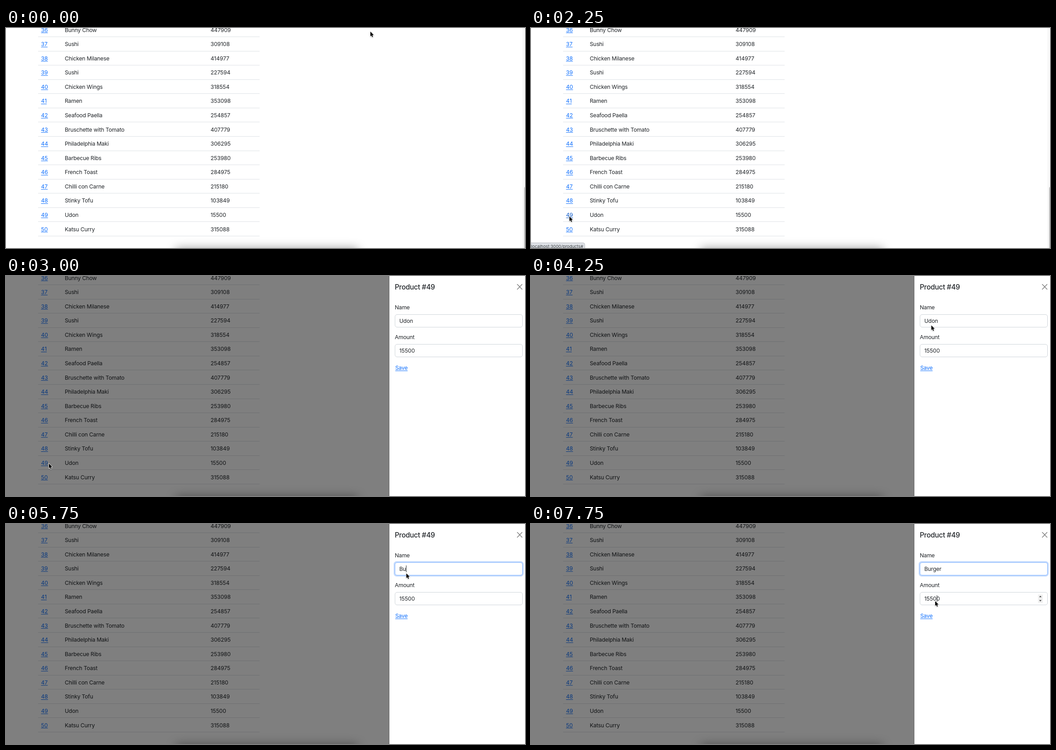
Animation of 1148x488 px, one loop 8000 ms. Source, as an HTML page with a canvas:

```html
<!DOCTYPE html>
<html lang="en">
<head>
<meta charset="utf-8">
<title>Products</title>
<style>
html, body { margin: 0; width: 100%; height: 100%; overflow: hidden; background: #fff; }
canvas { display: block; width: 1148px; height: 488px; }
</style>
</head>
<body>
<canvas id="stage"></canvas>
<script>
const W = 1148, H = 488, LOOP = 8000, STEP = 250;
const FONT = 'Inter, "Liberation Sans", sans-serif';
const INK = '#212529', LINK = '#0d6efd', LINK_HOVER = '#0a58ca', LINE = '#dee2e6';
const ROW_H = 31.57, FIRST_ROW = 4.2;

const canvas = document.getElementById('stage');
const ctx = canvas.getContext('2d');
const ratio = window.devicePixelRatio || 1;
canvas.width = W * ratio;
canvas.height = H * ratio;

const rows = [
  ['Bunny Chow', 447909], ['Sushi', 309108], ['Chicken Milanese', 414977],
  ['Sushi', 227594], ['Chicken Wings', 318554], ['Ramen', 353098],
  ['Seafood Paella', 254857], ['Bruschette with Tomato', 407779],
  ['Philadelphia Maki', 306295], ['Barbecue Ribs', 253980],
  ['French Toast', 284975], ['Chilli con Carne', 215180],
  ['Stinky Tofu', 103849], ['Udon', 15500], ['Katsu Curry', 315088]
];

// Pointer stops: time, x, y
const path = [
  [0, 806, 8], [1250, 110, 406], [1750, 85, 418], [2750, 85, 418],
  [3000, 95, 416], [3750, 831, 154], [4250, 885.5, 109.5], [6750, 885.5, 109.5],
  [7500, 894, 171], [LOOP, 894, 171]
];

const ease = p => p * p * (3 - 2 * p);

function pointerAt(t) {
  const i = path.findIndex(k => k[0] > t);
  const [t0, x0, y0] = path[i - 1], [t1, x1, y1] = path[i];
  const p = ease((t - t0) / (t1 - t0));
  return [x0 + (x1 - x0) * p, y0 + (y1 - y0) * p];
}

// Draws text centred on the line y and returns its width
function text(str, x, y, { size = 12.2, weight = 400, color = INK, spacing = -0.2, underline = false } = {}) {
  ctx.font = `${weight} ${size}px ${FONT}`;
  ctx.letterSpacing = spacing + 'px';
  ctx.fillStyle = color;
  const base = y + size * 0.364;
  ctx.fillText(str, x, base);
  const width = ctx.measureText(str).width;
  if (underline) ctx.fillRect(x, base + 1.5, width, 1);
  return width;
}

function rect(x, y, w, h, color) {
  ctx.fillStyle = color;
  ctx.fillRect(x, y, w, h);
}

function box(x, y, w, h, r, fill, stroke) {
  ctx.beginPath();
  ctx.roundRect(x, y, w, h, r);
  if (fill) { ctx.fillStyle = fill; ctx.fill(); }
  if (stroke) { ctx.strokeStyle = stroke; ctx.lineWidth = 1; ctx.stroke(); }
}

function poly(points, color) {
  ctx.beginPath();
  points.forEach(([x, y]) => ctx.lineTo(x, y));
  ctx.closePath();
  ctx.fillStyle = color;
  ctx.fill();
}

function drawTable(hover) {
  rows.forEach(([name, amount], i) => {
    const y = FIRST_ROW + i * ROW_H, id = 36 + i;
    text(String(id), 77.5, y, { color: hover === id ? LINK_HOVER : LINK, underline: true, spacing: 0 });
    text(name, 130, y);
    text(String(amount), 452.5, y, { spacing: -0.1 });
    rect(71, Math.round(y + 14.8), 490, 1, LINE);
  });
}

function drawDockShadow() {
  ctx.save();
  ctx.shadowColor = 'rgba(0,0,0,.4)';
  ctx.shadowBlur = 22 * ratio;
  rect(376, 489, 402, 40, '#000');
  ctx.restore();
}

function drawScrollbar() {
  rect(1143, 0, 5, H, '#fafafa');
  rect(1143, 0, 1, H, '#eeeeee');
  box(1146, 352, 8, 150, 4, '#c1c1c1');
}

function drawStatus(alpha) {
  ctx.save();
  ctx.globalAlpha = alpha;
  box(-5, 476.5, 124, 20, 4, '#dee1e6', '#b9bcc1');
  text('localhost:3000/products#', 0.5, 484.5, { size: 9.4, color: '#3c4043', spacing: 0 });
  ctx.restore();
}

function drawField(y, focused) {
  if (focused) box(857.5, y - 2.5, 287.5, 34, 6.5, '#c3dafe');
  box(860.5, y + 0.5, 282, 28, 4.5, '#fff', focused ? '#86b7fe' : '#ced4da');
}

function drawSpinner() {
  rect(1121.5, 156.5, 10.5, 18.5, '#efefef');
  poly([[1124, 162.3], [1129.4, 162.3], [1126.7, 159.2]], '#444');
  poly([[1124, 168.7], [1129.4, 168.7], [1126.7, 171.8]], '#444');
}

function drawCaret(x, y) {
  rect(x, y - 7.5, 1, 15, '#212529');
}

function typedName(t) {
  if (t < 5750) return 'Udon';
  return 'Burger'.slice(0, [2, 3, 5, 6][Math.min(3, (t - 5750) / STEP)]);
}

function drawPanel(t) {
  const focused = t >= 4500;
  ctx.save();
  ctx.translate(t < 3000 ? 71 : 0, 0);
  rect(848, 0, 310, H, '#fff');
  rect(847, 0, 1, H, 'rgba(0,0,0,.2)');
  text('Product #49', 860, 24.2, { size: 15.4, weight: 500, spacing: -0.25 });

  ctx.strokeStyle = '#7f7f7f';
  ctx.lineWidth = 1.5;
  ctx.lineCap = 'round';
  ctx.beginPath();
  ctx.moveTo(1131, 18.5); ctx.lineTo(1141.5, 29.5);
  ctx.moveTo(1141.5, 18.5); ctx.lineTo(1131, 29.5);
  ctx.stroke();

  text('Name', 860, 69.7);
  drawField(85, focused);
  if (t >= 4750 && t < 5750) rect(870, 90.5, 31, 18, '#b3d7ff');
  const end = 870 + text(typedName(t), 870, 99.7);
  if (focused && t < 7750 && !(t >= 4750 && t < 5750)) drawCaret(end, 99.5);

  text('Amount', 860, 136);
  drawField(151, false);
  text('15500', 870, 166, { spacing: -0.1 });
  if (t >= 7250) drawSpinner();
  if (t >= 7750) drawCaret(897.5, 165.5);

  text('Save', 861, 203.8, { color: LINK, underline: true });
  ctx.restore();
}

function drawPointer([x, y]) {
  ctx.save();
  ctx.translate(x, y);
  ctx.beginPath();
  [[0, 0], [0, 10.6], [2.4, 8.4], [4, 12.2], [5.8, 11.4], [4.2, 7.8], [7.4, 7.6]]
    .forEach(([px, py]) => ctx.lineTo(px, py));
  ctx.closePath();
  ctx.lineJoin = 'round';
  ctx.lineWidth = 1.6;
  ctx.strokeStyle = '#fff';
  ctx.shadowColor = 'rgba(0,0,0,.3)';
  ctx.shadowBlur = 2 * ratio;
  ctx.shadowOffsetY = ratio * 0.7;
  ctx.stroke();
  ctx.shadowColor = 'transparent';
  ctx.fillStyle = '#000';
  ctx.fill();
  ctx.restore();
}

function draw(t) {
  ctx.setTransform(ratio, 0, 0, ratio, 0, 0);
  rect(0, 0, W, H, '#fff');
  drawDockShadow();
  drawTable(t >= 1750 && t < 2750 ? 49 : 0);
  drawScrollbar();
  if (t >= 2750) {
    rect(0, 0, W, H, 'rgba(0,0,0,.5)');
    drawPanel(t);
  }
  if (t >= 2000 && t < 3000) drawStatus(t < 2250 ? 0.5 : 1);
  drawPointer(pointerAt(t));
}

// The screen refreshes four times a second
const start = performance.now();
function tick() {
  const t = (performance.now() - start) % LOOP;
  draw(Math.floor(t / STEP) * STEP);
  requestAnimationFrame(tick);
}
tick();
</script>
</body>
</html>
```
